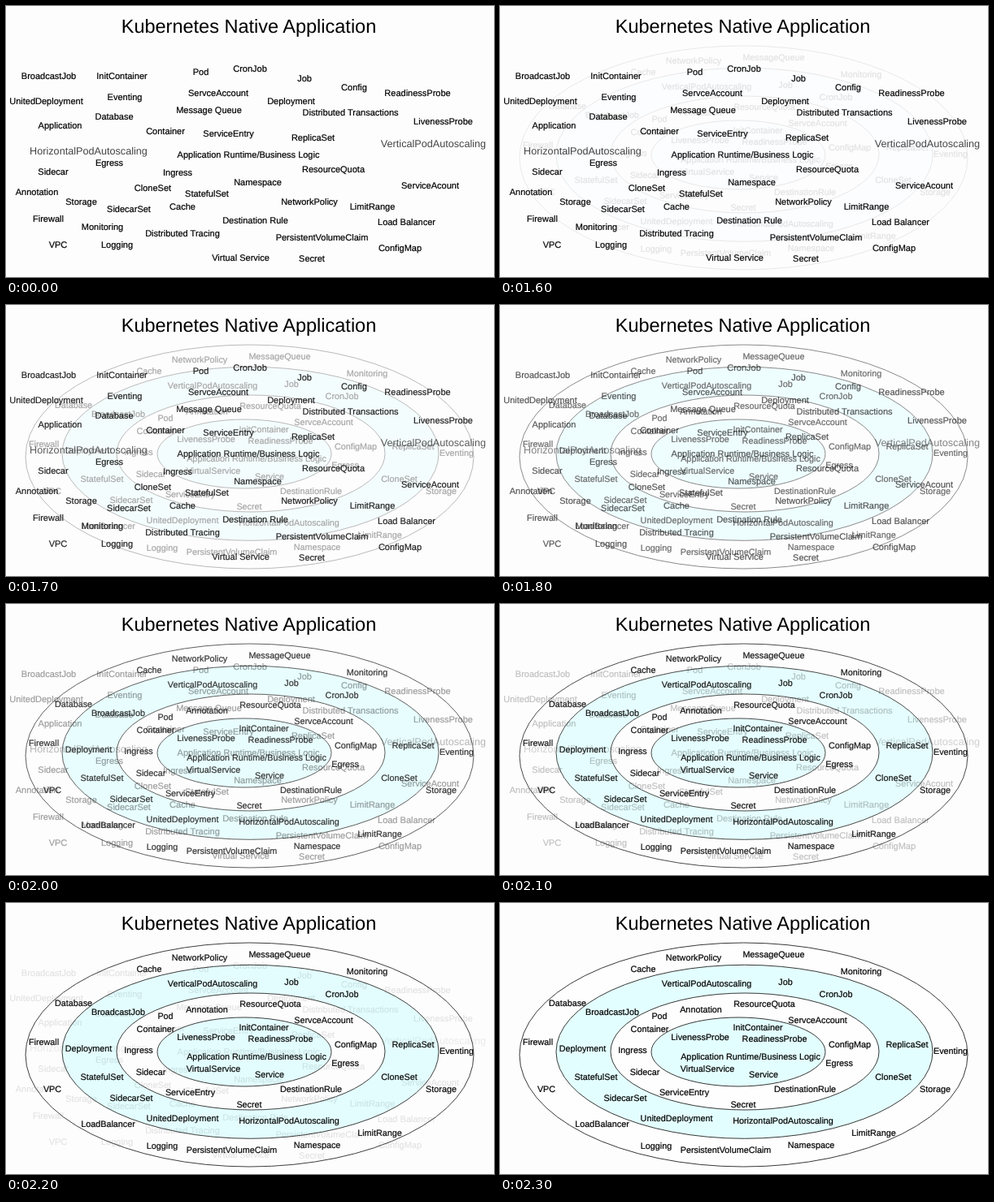
Animation of 600 by 334 pixels, one loop 5400 ms. Source, as an HTML page:

```html
<!DOCTYPE html>
<html lang="en">
<head>
<meta charset="utf-8">
<title>Kubernetes Native Application</title>
<style>
html, body { margin: 0; width: 100%; height: 100%; overflow: hidden; background: #fefdfe; }
svg { display: block; width: 600px; height: 334px; }
text {
  font-family: "Liberation Sans", Arial, sans-serif;
  text-anchor: middle;
  text-rendering: geometricPrecision;
}
g text { stroke: #000; stroke-width: 0.2; }
ellipse { fill: #fefefe; stroke: #222; stroke-width: 0.9; }
.tint { fill: #e3fefe; }
#rings { font-size: 10.8px; }
#cloud { font-size: 11px; }
#cloud .big { font-size: 12.65px; fill: #444; stroke: none; }
</style>
</head>
<body>
<svg viewBox="0 0 600 334">
  <text x="298.5" y="33.3" font-size="23.5">Kubernetes Native Application</text>
  <g id="rings">
    <ellipse cx="299.5" cy="187" rx="275.5" ry="138"/>
    <ellipse cx="300.5" cy="183.3" rx="231.5" ry="107" class="tint"/>
    <ellipse cx="301" cy="183" rx="165" ry="72"/>
    <ellipse cx="293" cy="183.5" rx="107" ry="42.5" class="tint"/>
  </g>
  <g id="cloud"></g>
</svg>
<script>
// Each label: centre x, middle of the capitals y, text; "*" marks a larger one.
const cloudLabels = `52.5 86 BroadcastJob|142.5 86 InitContainer|239.5 81 Pod|300 77 CronJob
367 89 Job|428 100 Config|506 107 ReadinessProbe|49.5 117 UnitedDeployment|146 112 Eventing
261 107 ServceAccount|350.5 117 Deployment|133 136 Database|249.5 128 Message Queue
423.5 131 Distributed Transactions|537.5 142 LivenessProbe|66.5 147 Application|196 154 Container
273.5 157 ServiceEntry|377.5 162 ReplicaSet|525.5 169 *VerticalPodAutoscaling
101.5 178.5 *HorizontalPodAutoscaling|127 193 Egress|298 183 Application Runtime/Business Logic
58 204 Sidecar|211 205 Ingress|402.5 201 ResourceQuota|180.5 224 CloneSet|247 231 StatefulSet
309.5 217 Namespace|521.5 221 ServiceAcount|38 229 Annotation|92.5 241 Storage|151 250 SidecarSet
217 247 Cache|373 241 NetworkPolicy|450.5 247 LimitRange|52 262 Firewall|118.5 272 Monitoring
217 280 Distributed Tracing|306.5 264 Destination Rule|388.5 285 PersistentVolumeClaim
492.5 266 Load Balancer|64 294 VPC|136.5 294 Logging|288.5 310 Virtual Service|376 311 Secret
484.5 298 ConfigMap`;

const ringLabels = `238 67 NetworkPolicy|336.5 63 MessageQueue|176 81 Cache|444 84 Monitoring
254 99 VerticalPodAutoscaling|351 97 Job|413 112 CronJob|83 123 Database|138 134 BroadcastJob
196 139 Pod|247 131 Annotation|325 124 ResourceQuota|390.5 144 ServceAccount|184 155 Container
317 153 InitContainer|246 165 LivenessProbe|337.5 167 ReadinessProbe|46.5 171 Firewall
101.5 179 Deployment|163 181 Ingress|430 174 ConfigMap|500.5 174 ReplicaSet|554 182 Eventing
308 189 Application Runtime/Business Logic|178 208 Sidecar|255 204 VirtualService|324 211 Service
417 197 Egress|118 214 StatefulSet|483.5 214 CloneSet|57 229 VPC|535 229 Storage
154 240 SidecarSet|226.5 233 ServiceEntry|299 248 Secret|375 229 DestinationRule
217 265 UnitedDeployment|348 268 HorizontalPodAutoscaling|125.5 272 LoadBalancer|192 299 Logging
277.5 304 PersistentVolumeClaim|382.5 298 Namespace|459.5 283 LimitRange`;

const rings = document.getElementById("rings");
const cloud = document.getElementById("cloud");

function addLabels(group, list) {
  for (const item of list.split(/[|\n]/)) {
    const [, x, y, star, name] = item.match(/^(\S+) (\S+) (\*?)(.+)$/);
    const label = document.createElementNS("http://www.w3.org/2000/svg", "text");
    label.setAttribute("x", x);
    label.setAttribute("y", +y + (star ? 4.5 : 4));
    if (star) label.setAttribute("class", "big");
    label.textContent = name;
    group.append(label);
  }
}
addLabels(rings, ringLabels);
addLabels(cloud, cloudLabels);

// The cross-fade runs in hard steps of 100 ms.
const LOOP = 5400, FADE_START = 1600, STEP = 100;
const ringFade = [0, 0.1, 0.34, 0.58, 0.7, 0.8, 0.91, 0.97, 1];
const cloudFade = [1, 0.98, 0.87, 0.66, 0.52, 0.38, 0.24, 0.1, 0];
const start = performance.now();

function draw() {
  const t = (performance.now() - start) % LOOP;
  const step = Math.floor((t - FADE_START) / STEP) + 1;
  const i = Math.max(0, Math.min(ringFade.length - 1, step));
  rings.setAttribute("opacity", ringFade[i]);
  cloud.setAttribute("opacity", cloudFade[i]);
  requestAnimationFrame(draw);
}
draw();
</script>
</body>
</html>
```
